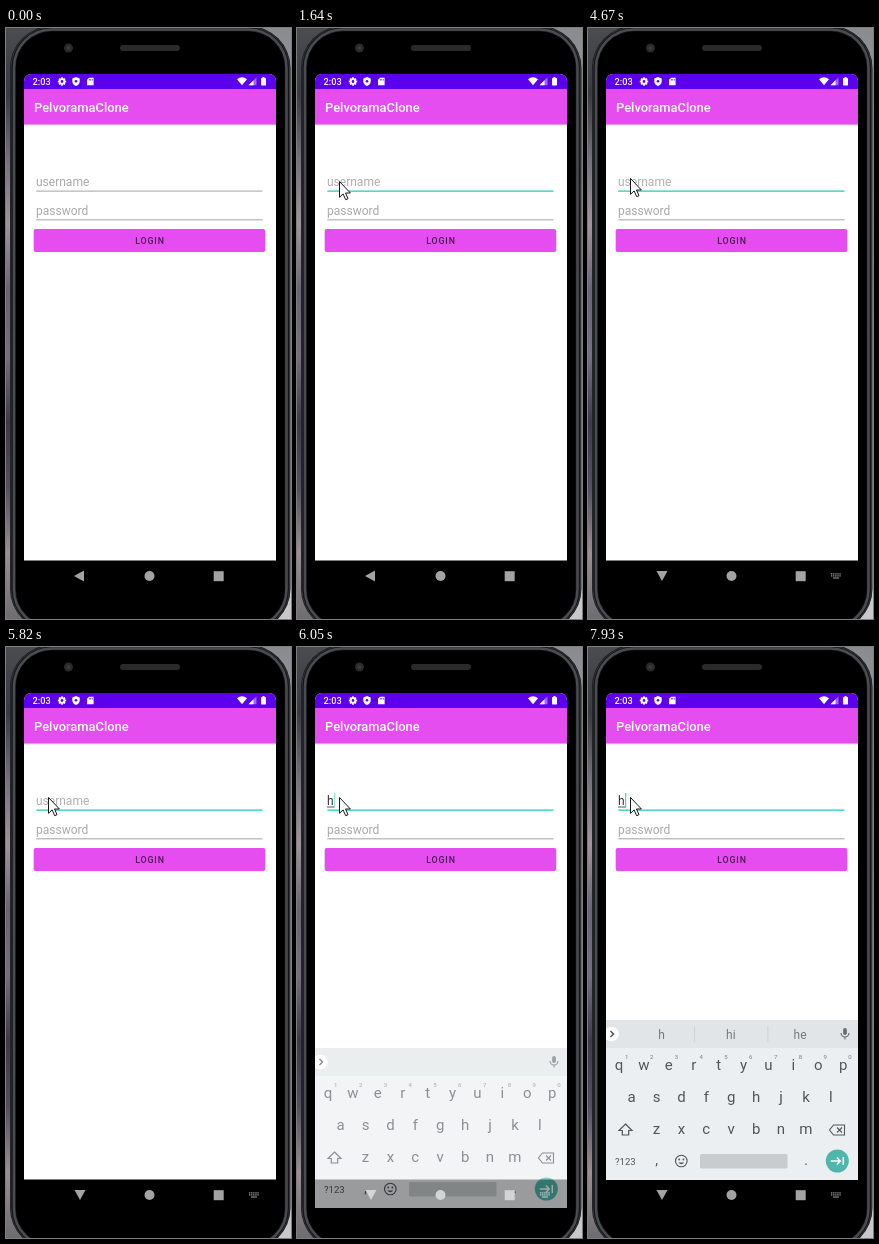
Write an HTML page with a canvas that moves like this. It is 285 px wide and 591 px high and loops after 8000 ms.

```html
<!DOCTYPE html>
<html lang="en">
<head>
<meta charset="utf-8">
<title>Login screen</title>
<style>
html, body { margin: 0; width: 100%; height: 100%; overflow: hidden; background: #000; }
canvas { display: block; width: 285px; height: 591px; }
</style>
</head>
<body>
<canvas id="stage"></canvas>
<script>
const W = 285, H = 591, LOOP = 8000;
const PINK = '#e64df0', TEAL = '#45d6c3', VIOLET = '#5c00ee', LINE = '#c2c2c2', KEY = '#51565a';
const dpr = window.devicePixelRatio || 1;
const stage = setup(document.getElementById('stage'));
const layer = setup(document.createElement('canvas'));
let g = stage;

function setup(canvas) {
  canvas.width = Math.round(W * dpr);
  canvas.height = Math.round(H * dpr);
  const ctx = canvas.getContext('2d');
  ctx.scale(dpr, dpr);
  return ctx;
}

function rect(x, y, w, h, color) {
  g.fillStyle = color;
  g.fillRect(x, y, w, h);
}

function round(x, y, w, h, r, color, line) {
  g.beginPath();
  g.roundRect(x, y, w, h, r);
  paint(color, line);
}

function disc(x, y, r, color, line) {
  g.beginPath();
  g.arc(x, y, r, 0, Math.PI * 2);
  paint(color, line);
}

function paint(color, line) {
  if (line) {
    g.strokeStyle = color;
    g.lineWidth = line;
    g.stroke();
  } else {
    g.fillStyle = color;
    g.fill();
  }
}

// Paths use SVG syntax, relative to x, y.
function shape(d, x, y, color, line) {
  g.save();
  g.translate(x, y);
  const p = new Path2D(d);
  if (line) {
    g.strokeStyle = color;
    g.lineWidth = line;
    g.stroke(p);
  } else {
    g.fillStyle = color;
    g.fill(p);
  }
  g.restore();
}

function text(s, x, y, size, color, { weight = 400, align = 'left', spacing = 0 } = {}) {
  g.font = `${weight} ${size}px Roboto, Arial, sans-serif`;
  g.textAlign = align;
  g.letterSpacing = spacing + 'px';
  g.fillStyle = color;
  g.fillText(s, x, y);
}

function fade(y0, y1, colors) {
  const grad = g.createLinearGradient(0, y0, 0, y1);
  colors.forEach((c, i) => grad.addColorStop(i / (colors.length - 1), c));
  return grad;
}

const within = (t, spans) => spans.some(([a, b]) => t >= a && t < b);

function drawBackdrop() {
  rect(0, 0, W / 2, H, fade(0, H, ['#4b4c50', '#3a3a40', '#75717a', '#a0949b', '#6a6572',
    '#77707c', '#3e3a46', '#55505e', '#9a8f92', '#6e6c70']));
  rect(W / 2, 0, W / 2, H, fade(0, H, ['#8a8b8e', '#c4c5c8', '#c8c8ca']));
}

function drawPhone() {
  round(4, -2, 280.5, 605, 42, '#141517');
  round(5, -1, 278.5, 603, 41, '#303236', 1);
  round(8, 1.5, 272.5, 598, 38, '#4a4c50', 2.5);
  round(10, 3.5, 268.5, 594, 36, '#000');
  disc(62.5, 20, 4.5, '#2a2a2b');
  disc(62.5, 20, 2, '#3c3c3f');
  round(114, 17, 60, 6, 3, '#2a2a2a');
}

function drawStatus() {
  text('2:03', 26.6, 57, 9.2, '#fff', { weight: 500 });
  for (let i = 0; i < 8; i++) {
    g.save();
    g.translate(56, 53.5);
    g.rotate(i * Math.PI / 4);
    rect(-0.9, -4.2, 1.8, 2.4, '#fff');
    g.restore();
  }
  disc(56, 53.5, 2.3, '#fff', 1.7);
  shape('M0-4.5L3.7-3V0Q3.5 3 0 4.5Q-3.5 3-3.7 0V-3Z', 70, 53.5, '#fff');
  disc(70, 53.2, 1.3, VIOLET);
  shape('M-1.2-3.8H3.3V3.8H-3.3V-1.7Z', 84.3, 53.5, '#fff');
  for (let i = 0; i < 3; i++) rect(82.9 + i * 1.5, 51, 0.7, 1.6, VIOLET);
  shape('M-5-2Q0-6 5-2L0 4Z', 236, 53.3, '#fff');
  shape('M4-4V4H-4Z', 246.5, 53.3, 'rgba(255,255,255,.4)');
  shape('M1-1V4H-4Z', 246.5, 53.3, '#fff');
  round(255, 50, 5, 7.5, 0.7, '#fff');
  rect(256.5, 49, 2, 1.5, '#fff');
}

function drawApp(t) {
  const focused = t >= 920, typed = t >= 5970;
  g.save();
  g.beginPath();
  g.roundRect(18, 46, 252, 486.6, [7, 7, 0, 0]);
  g.clip();
  rect(18, 46, 252, 487, '#fff');
  rect(18, 46, 252, 15, VIOLET);
  rect(18, 61, 252, 35.5, PINK);
  rect(18, 96.5, 252, 2, fade(96.5, 98.5, ['rgba(0,0,0,.12)', 'rgba(0,0,0,0)']));
  g.restore();
  drawStatus();
  text('PelvoramaClone', 28, 84, 12.9, '#fff', { weight: 500 });

  if (typed) {
    text('h', 30, 158, 12, '#303030');
    rect(30, 159.5, 7, 1, '#555');
  } else {
    text('username', 30, 158, 12, t < 1470 ? '#a9a9a9' : '#b0b0b0');
  }
  text('password', 30, 187, 12, '#a9a9a9');
  rect(30.3, 162.4, 226.2, 1.5, focused ? TEAL : LINE);
  rect(30.3, 191, 226.2, 1.5, LINE);
  round(27.7, 201.4, 231.5, 23.2, 2, 'rgba(0,0,0,.08)');
  round(27.7, 201, 231.5, 23, 2, PINK);
  text('LOGIN', 144, 216.2, 8.8, '#4d1753', { weight: 500, align: 'center', spacing: 0.85 });

  const caret = within(t, [[1150, 1640], [2020, 2570], [3040, 3590], [4140, 4670],
    [5740, 5820], [5970, 6530], [6980, 7380], [7930, LOOP]]);
  if (caret) {
    g.globalAlpha = t >= 5970 && t < 6430 ? 0.6 : 1;
    rect(typed ? 37 : 30.4, 146, 1.2, 15, TEAL);
    g.globalAlpha = 1;
  }
}

function drawKeys(t) {
  const mid = { align: 'center' };
  rect(18, 373, 252, 160, '#eceff1');
  rect(18, 373, 252, 28, '#e1e5e7');
  g.save();
  g.beginPath();
  g.rect(18, 373, 252, 160);
  g.clip();
  disc(23.5, 387, 7.3, '#fff');
  g.restore();
  shape('M-1.5-3L1.5 0L-1.5 3', 24, 387, '#444', 1.3);
  round(255.2, 381, 3.6, 7, 1.8, '#666b6e');
  shape('M-4-.5Q-3.5 3.5 0 3.5Q3.5 3.5 4-.5M0 3.5V6', 257, 386.5, '#666b6e', 1.1);
  if (t >= 6430) {
    ['h', 'hi', 'he'].forEach((s, i) => text(s, 73.5 + i * 69.3, 391.5, 12, '#747a7e', mid));
    rect(106, 379, 0.8, 16, '#c9ced1');
    rect(179.5, 379, 0.8, 16, '#c9ced1');
  }
  [['qwertyuiop', 31, 422.5], ['asdfghjkl', 43.7, 455], ['zxcvbnm', 68.5, 487]]
    .forEach(([keys, x, y]) => [...keys].forEach((c, i) =>
      text(c, x + i * 24.9, y, 15, KEY, mid)));
  [...'1234567890'].forEach((c, i) => text(c, 38.8 + i * 24.8, 411.8, 6, '#777c80', mid));

  shape('M0-6L6.5 .5H3.2V5H-3.2V.5H-6.5Z', 37.5, 483, KEY, 1.2);
  shape('M-3.5-5H7.5V5H-3.5L-7.5 0ZM0-2.5L5 2.5M5-2.5L0 2.5', 249, 483, KEY, 1.1);
  text('?123', 37.3, 517.5, 9.5, KEY, mid);
  text(',', 68.7, 518, 14, KEY, mid);
  disc(93.3, 514, 5.8, KEY, 1.1);
  disc(91.2, 512.5, 0.9, KEY);
  disc(95.4, 512.5, 0.9, KEY);
  shape('M-3 1.5Q0 5 3 1.5Z', 93.3, 514, KEY);
  round(112, 507, 87.5, 14.5, 1.5, '#c8ccce');
  text('.', 218, 518, 14, KEY, mid);
  disc(249.3, 514, 11.5, '#4fb6ac');
  shape('M-6.5 0H3M-.5-3.5L3 0L-.5 3.5M6-4V4', 249.3, 514, '#fff', 1.5);
}

function drawKeyboard(t) {
  if (t < 6050) return;
  const sliding = t < 6200;
  layer.clearRect(0, 0, W, H);
  g = layer;
  drawKeys(t);
  g = stage;
  g.globalAlpha = sliding ? 0.65 : 1;
  g.drawImage(layer.canvas, 0, sliding ? 28 : 0, W, H);
  g.globalAlpha = 1;
}

function drawNav(t) {
  const color = t >= 6050 && t < 6200 ? '#d2d4d5' : '#a3a3a3';
  g.save();
  g.translate(t < 4140 ? 73 : 74, 548);
  g.rotate(t < 4140 ? 0 : t < 4220 ? -Math.PI / 4 : -Math.PI / 2);
  shape('M-5 0L5-5.5V5.5Z', 0, 0, color);
  g.restore();
  disc(143.5, 548, 5, color);
  rect(207.7, 543.2, 10, 10, color);
  if (t < 4220) return;
  for (let row = 0; row < 2; row++)
    for (let i = 0; i < 5; i++) rect(243 + i * 2.1, 545.3 + row * 2, 1.3, 1.2, color);
  rect(245, 549.5, 6, 1, color);
}

function drawPointer(t) {
  if (t < 240) return;
  if (t >= 770 && t < 920) disc(42, 153, 12, 'rgba(255,255,0,.47)');
  const k = Math.min(1, Math.floor((t - 240) / 76) / 5);
  const ease = 1 - (1 - k) * (1 - k);
  const x = 7 + 35 * ease;
  const y = t >= 1870 ? 150 : 143 + 10 * ease;
  const arrow = 'M.5 .5V16.3L4.1 12.9L6.7 18.7L9 17.7L6.5 12H11.4Z';
  shape(arrow, x, y, '#fff');
  shape(arrow, x, y, '#000', 0.9);
}

function frame(now) {
  const t = now % LOOP;
  drawBackdrop();
  drawPhone();
  drawApp(t);
  drawKeyboard(t);
  drawNav(t);
  drawPointer(t);
}

const start = performance.now();
function tick() {
  frame(performance.now() - start);
  requestAnimationFrame(tick);
}
tick();
</script>
</body>
</html>
```
